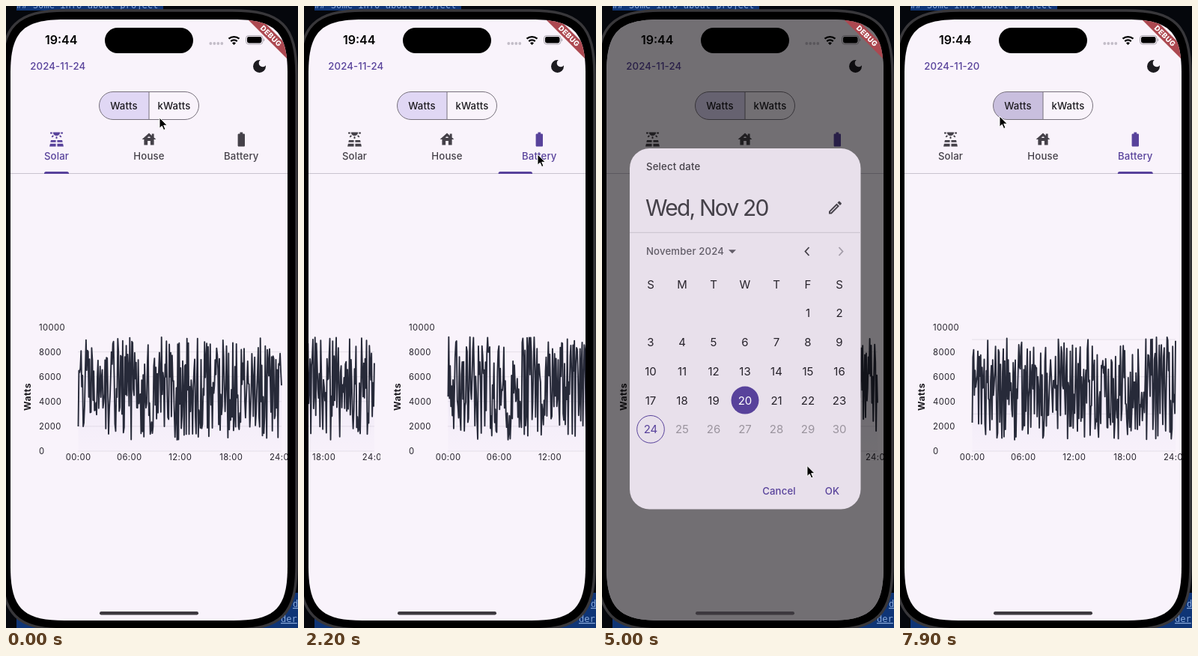
These frames come from a looping animation (390x830 px, 8 s). An HTML page:

```html
<!DOCTYPE html>
<html lang="en">
<head>
<meta charset="utf-8">
<title>Energy monitor</title>
<style>
html, body { margin: 0; width: 100%; height: 100%; overflow: hidden; background: #05070c; }
svg { display: block; width: 390px; height: 830px; font: 400 13.2px Inter, Roboto, sans-serif; font-optical-sizing: none; }
.mid { text-anchor: middle; }
.label { font-weight: 500; letter-spacing: .15px; }
.axis { font-size: 11.3px; letter-spacing: .4px; fill: #25222b; }
.day { font-size: 15px; fill: #27232b; text-anchor: middle; }
.mono { font: 12.1px "DejaVu Sans Mono", monospace; fill: #88a9dc; }
.kw .w, svg:not(.kw) .k, .kgrid .wg, svg:not(.kgrid) .kg { display: none; }
</style>
</head>
<body>
<svg id="stage" viewBox="0 0 390 830"></svg>
<script>
const INK = '#1d1b20', VIOLET = '#58429b', GREY = '#454149', BG = '#f9f3fb';
const stage = document.getElementById('stage');
const $ = id => document.getElementById(id);
const set = (id, attrs) => { for (const k in attrs) $(id).setAttribute(k, attrs[k]); };

const text = (x, y, str, attrs = '') => `<text x="${x}" y="${y}" ${attrs}>${str}</text>`;
const rect = (x, y, w, h, fill, attrs = '') =>
  `<rect x="${x}" y="${y}" width="${w}" height="${h}" fill="${fill}" ${attrs}/>`;
const hline = (x1, x2, y, color, attrs = '') =>
  `<path d="M${x1} ${y}H${x2}" stroke="${color}" ${attrs}/>`;
// 24-unit icon centred on a point
const icon = (cx, cy, d, attrs = '') =>
  `<path transform="translate(${cx - 11.3} ${cy - 11.3}) scale(.942)" d="${d}" ${attrs}/>`;
// box with smooth corners: a = corner length, c = control inset
const squircle = (l, t, r, b, a, c) =>
  `M${l} ${t + a}C${l} ${t + c} ${l + c} ${t} ${l + a} ${t}H${r - a}C${r - c} ${t} ${r} ${t + c} ${r} ${t + a}
   V${b - a}C${r} ${b - c} ${r - c} ${b} ${r - a} ${b}H${l + a}C${l + c} ${b} ${l} ${b - c} ${l} ${b - a}z`;

const ICONS = {
  solar: 'M3.33 16H11V13H4zM13 16H20.67L20 13H13zM21.11 18H13V22H22zM2 22H11V18H2.89zM11 8H13V11H11zM15.76 7.2L17.18 5.8 19.3 7.9 17.9 9.3zM4.7 7.9L6.8 5.8 8.24 7.2 6.12 9.3zM3 2H6V4H3zM18 2H21V4H18zM12 7c2.76 0 5-2.24 5-5H7C7 4.76 9.24 7 12 7z',
  house: 'M19 9.3V4h-3v2.6L12 3 2 12h3v8h5v-6h4v6h5v-8h3zM10 10c0-1.1.9-2 2-2s2 .9 2 2z',
  battery: 'M15.67 4H14V2h-4v2H8.33C7.6 4 7 4.6 7 5.33v15.33C7 21.4 7.6 22 8.33 22h7.33c.74 0 1.34-.6 1.34-1.33V5.33C17 4.6 16.4 4 15.67 4z',
  moon: 'M12 3a9 9 0 1 0 9 9c0-.46-.04-.92-.1-1.36A5.4 5.4 0 1 1 13.36 3.1C12.92 3.04 12.46 3 12 3z',
  pencil: 'M14.06 9.02l.92.92L5.92 19H5v-.92l9.06-9.06M17.66 3c-.25 0-.51.1-.7.29l-1.83 1.83 3.75 3.75 1.83-1.83c.39-.39.39-1.02 0-1.41l-2.34-2.34c-.2-.2-.45-.29-.71-.29zm-3.6 3.19L3 17.25V21h3.75L17.81 9.94z'
};
const TABS = [['Solar', 67.5, 33, ICONS.solar], ['House', 191, 41, ICONS.house], ['Battery', 314.3, 47, ICONS.battery]];

// Chart: random readings every five minutes of a day
const levelY = v => 594 - v * .01655;
function readings(seed, first, last) {
  const n = 288;
  let s = seed, d = '';
  for (let i = 0; i <= n; i++) {
    s = (s * 16807) % 2147483647;
    const v = i == 0 ? first : i == n ? last : 900 + 8300 * (s / 2147483647);
    d += `${i ? 'L' : 'M'}${(96.5 + 271.5 * i / n).toFixed(1)} ${levelY(v).toFixed(1)}`;
  }
  return `<path d="${d}V594H96.5z" fill="url(#haze)"/>
    <path d="${d}" fill="none" stroke="#272a39" stroke-width="1.9" stroke-linejoin="round"/>`;
}
function page(i, lines) {
  const grid = (levels, cls) => `<g class="${cls}">` +
    levels.map(v => hline(96, 368, levelY(v), '#e5dfe8')).join('') + '</g>';
  const labels = (levels, unit, cls) => `<g class="${cls} axis">` +
    levels.map(v => text(44, levelY(v) + 4, v / unit)).join('') + '</g>';
  const title = (str, cls) => text(0, 0, str,
    `class="${cls} mid" transform="translate(33 521.5) rotate(-90)" font-size="12.2" font-weight="700" letter-spacing=".5" fill="${INK}"`);
  const watts = [0, 2000, 4000, 6000, 8000], kilo = [0, 3000, 6000, 9000];
  return `<g transform="translate(${i * 370} 0)" clip-path="url(#page)">
    ${grid(watts, 'wg')}${grid(kilo, 'kg')}${lines}
    ${labels([...watts, 10000], 1, 'w')}${labels(kilo, 1000, 'k')}
    ${title('Watts', 'w')}${title('kWatts', 'k')}
    ${['00:00', '06:00', '12:00', '18:00', '24:00'].map((s, j) => text(96.7 + 68 * j, 606, s, 'class="axis mid"')).join('')}
  </g>`;
}

// Date picker
const dayX = c => 65 + 42 * c, dayY = r => 410 + 38.7 * r;
const dayPos = n => [dayX((n + 4) % 7), dayY(Math.floor((n + 4) / 7))];
function picker() {
  let days = '';
  for (let n = 1; n <= 30; n++) {
    const [x, y] = dayPos(n);
    days += text(x, y + 5.4, n, `id="day${n}" class="day" ${n > 24 ? 'opacity=".4"' : ''}`);
  }
  const [x24, y24] = dayPos(24);
  return `<g id="dialog">
    ${rect(37, 190, 308.5, 481.5, '#e8e0eb', 'rx="26.4"')}
    ${text(59, 219, 'Select date', `class="label" fill="${GREY}"`)}
    ${text(58, 280, '', `id="heading" font-size="30" letter-spacing="-1.8" fill="${GREY}"`)}
    ${icon(311.5, 269, ICONS.pencil, `fill="${GREY}"`)}
    ${hline(37, 345.5, 302.3, '#c8c1cc')}
    ${text(59, 332, 'November 2024', 'class="label" fill="#625d68"')}
    <path d="M169 325.3h10l-5 5z" fill="#625d68"/>
    <path d="M276.5 322l-5 5.5 5 5.5" fill="none" stroke="${GREY}" stroke-width="1.8"/>
    <path d="M316.5 322l5 5.5-5 5.5" fill="none" stroke="#a39ca8" stroke-width="1.8"/>
    ${[...'SMTWTFS'].map((s, c) => text(dayX(c), 376.7, s, 'class="day"')).join('')}
    <circle cx="${x24}" cy="${y24}" r="18.3" fill="none" stroke="${VIOLET}"/>
    <circle id="chosen" r="18.5" fill="${VIOLET}"/>
    ${days}
    ${rect(280, 629.5, 55, 37, VIOLET, 'id="okHover" rx="18.5"')}
    ${text(236.5, 652, 'Cancel', `class="label mid" fill="${VIOLET}"`)}
    ${text(307.5, 652, 'OK', `class="label mid" fill="${VIOLET}"`)}
  </g>`;
}

stage.innerHTML = `
<defs>
  <clipPath id="screen"><path d="${squircle(6, 18, 376, 820, 72, 16.5)}"/></clipPath>
  <clipPath id="page"><rect x="6" y="224" width="370" height="596"/></clipPath>
  <clipPath id="dateClip"><path d="M21 74H120V80a18 18 0 0 1-18 18.5H39A18 18 0 0 1 21 80z"/></clipPath>
  <clipPath id="leftHalf"><rect x="124" y="114" width="67" height="38"/></clipPath>
  <clipPath id="rightHalf"><rect x="191" y="114" width="68" height="38"/></clipPath>
  <linearGradient id="haze" x2="0" y2="1">
    <stop stop-color="#6c7ac0" stop-opacity=".14"/><stop offset="1" stop-color="#b9a4e0" stop-opacity=".03"/>
  </linearGradient>
</defs>
${rect(0, 0, 390, 830, '#05070c')}
${rect(14, 0, 196, 6, '#0f3576')}
${rect(14, 783, 376, 47, '#0f3576')}
${text(14, 2.5, '## Some info about project', 'class="mono"')}
${text(383, 802, 'd', 'class="mono" text-decoration="underline"')}
${text(367, 822, 'der', 'class="mono" text-decoration="underline"')}
<path d="${squircle(-6, 6, 388, 832, 86, 20)}" stroke="#38373a" stroke-width="3.4"/>
<g clip-path="url(#screen)">
  ${rect(6, 18, 370, 802, BG)}
  ${text(52, 51.3, '19:44', 'font-size="16" font-weight="600"')}
  ${[0, 1, 2, 3].map(i => `<circle cx="${273.3 + 5 * i}" cy="50" r="1.9" fill="#c3bdc8"/>`).join('')}
  <path d="M297.5 43.7a10.5 10.5 0 0 1 14 0M300.3 47.1a6 6 0 0 1 8.4 0" fill="none" stroke="#000" stroke-width="2.3"/>
  <path d="M302 49.5a3.5 3.5 0 0 1 5 0l-2.5 2.5z"/>
  ${rect(320.5, 39.5, 22.5, 11.5, 'none', 'rx="3.6" stroke="#a9a4ad"')}
  ${rect(322, 41, 19.5, 8.5, '#000', 'rx="2.4"')}
  <path d="M344 43.3a2.3 2.3 0 0 1 0 4z" fill="#a9a4ad"/>

  <g clip-path="url(#dateClip)">
    ${rect(21, 60, 99, 39, VIOLET, 'id="dateHover"')}
    <circle id="ripple" cx="88" cy="80" fill="${VIOLET}" opacity=".14"/>
  </g>
  ${text(32.3, 85, '', `id="date" class="label" fill="${VIOLET}"`)}
  ${icon(338.5, 80.5, ICONS.moon, `fill="${INK}"`)}

  ${rect(124.5, 114.5, 133, 37, 'none', 'id="left" rx="18.5" clip-path="url(#leftHalf)"')}
  ${rect(124.5, 114.5, 133, 37, 'none', 'id="right" rx="18.5" clip-path="url(#rightHalf)"')}
  ${rect(124.5, 114.5, 133, 37, 'none', 'rx="18.5" stroke="#77717c"')}
  <path d="M191 114.5v37" stroke="#77717c"/>
  ${text(157.5, 137.5, 'Watts', `class="label mid" fill="${INK}"`)}
  ${text(224.5, 137.5, 'kWatts', `class="label mid" fill="${INK}"`)}

  ${TABS.map(([name, x, w, d], i) => `<g id="tab${i}">${icon(x, 178, d)}${text(x, 205.3, name, 'class="label mid"')}</g>`).join('')}
  ${hline(6, 376, 223.5, '#c9c3cf')}
  <path id="bar" fill="${VIOLET}"/>
  <g id="pages">
    ${page(0, readings(4711, 2000, 5300))}
    ${page(1, readings(90217, 5800, 7100))}
    ${page(2, `<g id="dayA">${readings(31337, 4400, 3900)}</g><g id="dayB">${readings(77003, 2300, 8900)}</g>`)}
  </g>
  ${rect(6, 18, 370, 802, '#000', 'id="scrim"')}
  ${picker()}
  <path d="M323 18H341L376 53V71z" fill="#ac4850"/>
  ${text(0, 3.5, 'DEBUG', 'class="mid" transform="translate(354 40) rotate(45)" font-size="9.6" font-weight="800" letter-spacing=".4" fill="#fff"')}
  ${rect(125, 808, 132, 4.4, '#3d393f', 'rx="2.2"')}
</g>
${rect(132, 29, 118, 34, '#000', 'rx="17"')}
<path id="cursor" d="M0 0V14.2L3.3 11.2 5.6 16.5 8 15.5 5.7 10.3H10.2z" fill="#000" stroke="#fff"/>`;

// Cursor stops: time, x, y
const PATH = [
  [0, 205, 149], [900, 190, 192], [1300, 191, 195], [1700, 277, 210], [1950, 312, 198], [2250, 312, 198],
  [2800, 89, 79], [3000, 89, 79], [3700, 130, 553], [3900, 130, 553], [4000, 132, 550], [4400, 191, 526],
  [4600, 191, 526], [5200, 303, 644], [5550, 303, 644], [6200, 224, 200], [6500, 224, 200],
  [6800, 226, 135], [7300, 224, 137], [7700, 133, 147], [8000, 133, 147]
];
const ramp = (t, a, b) => { const p = Math.min(1, Math.max(0, (t - a) / (b - a))); return p * p * (3 - 2 * p); };
const mix = (a, b, p) => a + (b - a) * p;
const within = (t, a, b) => t >= a && t < b;

function draw(t) {
  const k = PATH.findIndex(p => p[0] > t);
  const [t0, x0, y0] = PATH[k - 1], [t1, x1, y1] = PATH[k], p = ramp(t, t0, t1);
  set('cursor', { transform: `translate(${mix(x0, x1, p)} ${mix(y0, y1, p)})` });

  // tab pages and indicator
  const pos = ramp(t, 1050, 1350) + ramp(t, 2000, 2300);
  const tab = t < 1100 ? 0 : t < 2050 ? 1 : 2;
  TABS.forEach((_, i) => set('tab' + i, { fill: i == tab ? VIOLET : GREY }));
  const from = Math.min(1, Math.floor(pos)), a = TABS[from], b = TABS[from + 1];
  const cx = mix(a[1], b[1], pos - from), w = mix(a[2], b[2], pos - from);
  set('bar', { d: `M${cx - w / 2} 224v-.5a2.5 2.5 0 0 1 2.5-2.5h${w - 5}a2.5 2.5 0 0 1 2.5 2.5v.5z` });
  set('pages', { transform: `translate(${-370 * pos} 0)` });

  // date button and picker
  const renewed = t >= 5350, picked = t >= 4400;
  $('date').textContent = renewed ? '2024-11-20' : '2024-11-24';
  set('dayA', { opacity: renewed ? 0 : 1 });
  set('dayB', { opacity: renewed ? 1 : 0 });
  set('dateHover', { opacity: within(t, 2700, 3100) ? .06 : 0 });
  set('ripple', { r: within(t, 2850, 3100) ? 19 + Math.max(0, t - 2900) * .3 : 0 });
  const shown = ramp(t, 2950, 3150) * (1 - ramp(t, 5350, 5540));
  set('scrim', { opacity: .54 * shown });
  set('dialog', { opacity: shown });
  $('heading').textContent = picked ? 'Wed, Nov 20' : 'Sun, Nov 24';
  const [dx, dy] = dayPos(picked ? 20 : 24);
  set('chosen', { cx: dx, cy: dy });
  $('day24').style.fill = picked ? VIOLET : '#fff';
  $('day20').style.fill = picked ? '#fff' : '';
  set('okHover', { opacity: t > 5050 ? .14 : 0 });

  // unit switch; the grid settles later than the labels
  const kilo = within(t, 6850, 7800);
  stage.classList.toggle('kw', kilo);
  stage.classList.toggle('kgrid', t >= 6900);
  set('left', { fill: kilo ? 'none' : t >= 7800 ? '#c9bfde' : '#e0d7f4' });
  set('right', { fill: kilo ? (t < 7400 ? '#c9bfde' : '#e0d7f4') : 'none' });
}

function loop() {
  draw(Math.floor(performance.now() % 8000 / 100) * 100);
  requestAnimationFrame(loop);
}
loop();
</script>
</body>
</html>
```
